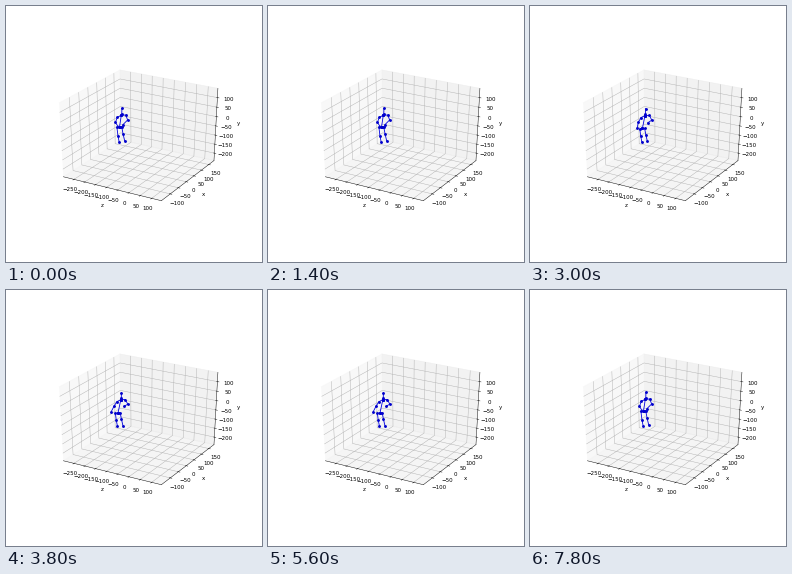
Animation, 256 px wide and 256 px high, one loop 8000 ms. Source, as a matplotlib script:

```python
import numpy as np
import matplotlib.pyplot as plt
from matplotlib.animation import FuncAnimation

SIZE, DPI = 256, 40
FRAMES, STEP = 40, 200


def ease(t, start, end):
    u = np.clip((t - start) / (end - start), 0, 1)
    return u * u * (3 - 2 * u)


def mix(a, b, w):
    return a + (b - a) * w


def limb(root, *segments):
    """Chain of joints; each segment is a length and an angle from down."""
    points = [np.array(root)]
    for length, angle in segments:
        a = np.radians(angle)
        points.append(points[-1] + length * np.array([np.sin(a), np.cos(a)]))
    return points


def body(w):
    """Limbs in pixels: w = 0 hands before the hips, w = 1 arms apart."""
    pelvis = np.array([mix(113.5, 112, w), mix(121, 123, w)])
    chest = np.array([mix(115.3, 114.8, w), mix(109.3, 109.8, w)])
    neck, head = chest + (.5, -1.8), chest + (.6, -7.1)
    left_hip, right_hip = pelvis + (-2.6, .2), pelvis + (2.2, -.2)
    return [
        [head, neck, chest, pelvis],
        [pelvis, *limb(left_hip, (mix(8.5, 6.8, w), 7), (6, 11))],
        [pelvis, *limb(right_hip, (mix(7.7, 6.4, w), 11), (6.6, 13))],
        [chest, *limb(chest + (-4, 2), (5.5, mix(-20, -32, w)),
                      (5.7, mix(34, -27, w)))],
        [chest, *limb(chest + (4.5, -.3), (5.3, mix(20, 28, w)),
                      (mix(6.7, 4.2, w), mix(-45, -60, w)))],
    ]


fig = plt.figure(figsize=(SIZE / DPI, SIZE / DPI), dpi=DPI)

# The plot is 4:3, centred in the square stage.
box = fig.add_axes([.125, .125 + .75 * .11, .775, .75 * .77],
                   projection='3d')
box.apply_aspect = lambda position=None: None  # keep the wide frame
box.set_box_aspect((1, 1, 1), zoom=.959)
box.view_init(30, -60)
box.set(xlim=(-300, 142), ylim=(-154, 186), zlim=(-242, 148),
        xticks=range(-250, 101, 50), yticks=range(-100, 151, 50),
        zticks=range(-200, 101, 50), xlabel='z', ylabel='x', zlabel='y')

stage = fig.add_axes([0, 0, 1, 1])
stage.set(xlim=(0, SIZE), ylim=(SIZE, 0))
stage.axis('off')
lines = [stage.plot([], [], 'o-', color='#0000e0', lw=1.5, ms=5.2,
                    mfc='#0000cc', mec='none')[0] for _ in body(0)]


def draw(n):
    t = n * STEP
    w = ease(t, 1400, 3800) - ease(t, 6400, 7800)
    for line, points in zip(lines, body(w)):
        line.set_data(*np.transpose(points))
    return lines


anim = FuncAnimation(fig, draw, frames=FRAMES, interval=STEP, repeat=True)
plt.show()
```
